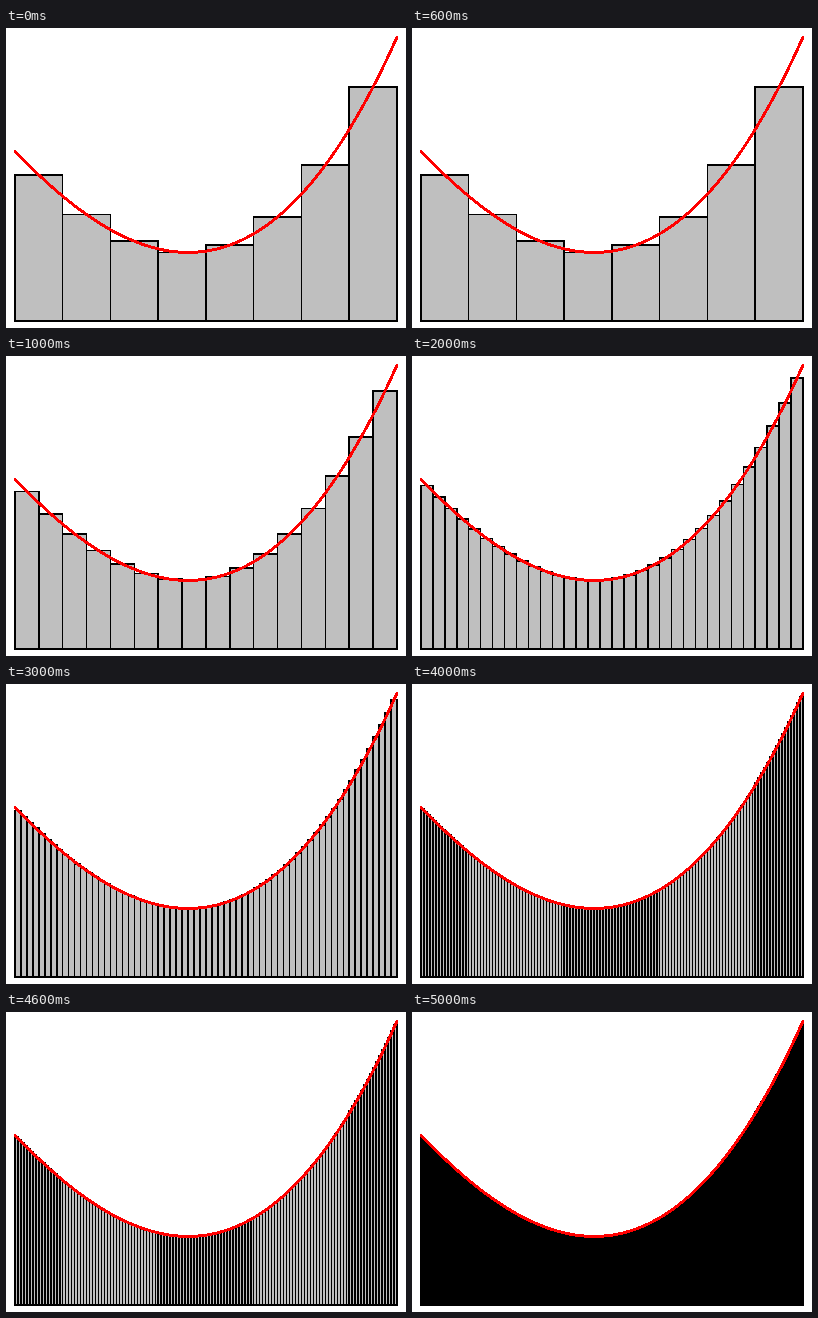
A matplotlib script for the animation above (6 s loop, 400 px wide and 300 px high).

```python
import numpy as np
import matplotlib.pyplot as plt
from matplotlib.animation import FuncAnimation
from matplotlib.collections import PolyCollection

W, H, DPI = 400, 300, 100
LEFT, RIGHT, BASE = 9, 391, 293
EDGE = 0.75    # half width of the bar outlines
CURVE = 1.5    # half width of the red curve


def curve(x):
    t = 8 * (x - LEFT) / (RIGHT - LEFT) - 4
    return BASE - (69.9 + 7.135 * t + 9.812 * t**2 + 0.4453 * t**3)


def rect(x0, y0, x1, y1):
    """Corners of a box, moved to whole pixels so that its edges stay hard."""
    x0, y0, x1, y1 = np.ceil(np.array([x0, y0, x1, y1]) - 0.5)
    x1, y1 = max(x0, x1), max(y0, y1)
    return [(x0, y0), (x1, y0), (x1, y1), (x0, y1)]


def midpoint_bars(n):
    edges = np.linspace(LEFT, RIGHT, n + 1)
    boxes = []
    for a, b in zip(edges[:-1], edges[1:]):
        top = curve((a + b) / 2)
        for grow in (EDGE, -EDGE):   # black outline, then grey inside
            boxes.append(rect(a - grow, top - grow, b + grow, BASE + grow))
    return boxes


def curve_image():
    """Red where a pixel's centre lies within the round pen's path."""
    yy, xx = np.mgrid[0:H, 0:W] + 0.5
    dist = np.full((H, W), np.inf)
    for x in np.linspace(LEFT, RIGHT, 1000):
        dist = np.minimum(dist, (xx - x)**2 + (yy - curve(x))**2)
    image = np.zeros((H, W, 4))
    image[dist <= CURVE**2] = (1, 0, 0, 1)
    return image


fig = plt.figure(figsize=(W / DPI, H / DPI), dpi=DPI, facecolor="white")
ax = fig.add_axes([0, 0, 1, 1])
ax.axis("off")

bars = PolyCollection(midpoint_bars(8), facecolors=["black", "#bfbfbf"],
                      edgecolors="none", linewidths=0, antialiaseds=False,
                      zorder=1)
ax.add_collection(bars, autolim=False)
ax.imshow(curve_image(), extent=(0, W, H, 0), interpolation="nearest",
          aspect="auto", zorder=2)
ax.set_xlim(0, W)
ax.set_ylim(H, 0)


def update(step):
    bars.set_verts(midpoint_bars(8 * 2**step))
    return [bars]


anim = FuncAnimation(fig, update, frames=6, interval=1000, repeat=True,
                     repeat_delay=0, init_func=lambda: update(0))
plt.show()
```
